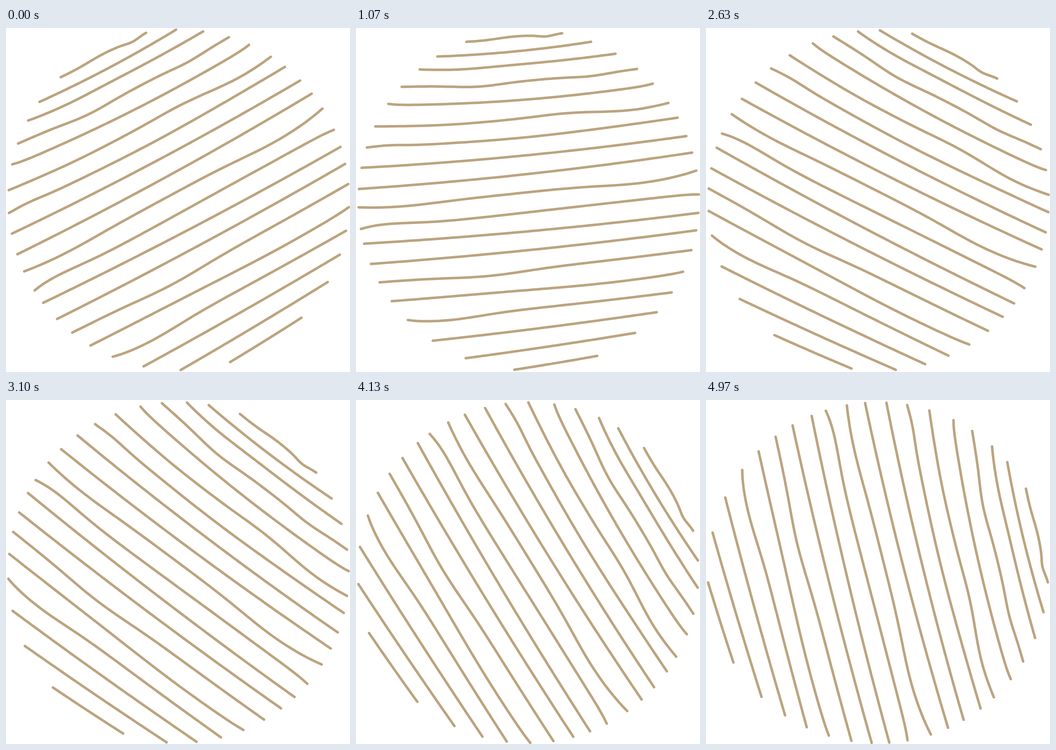
Recreate the animation shown at these times as an HTML page. Size 748x748 px, loop 5010 ms.

```html
<!DOCTYPE html>
<html lang="en">
<head>
<meta charset="utf-8">
<title>Turning lines</title>
<style>
  html, body { margin: 0; height: 100%; overflow: hidden; background: #fff; }
  svg { display: block; width: 100%; height: 100%; }
  path { fill: none; stroke: #bba47f; stroke-width: 5.5; stroke-linecap: round; stroke-linejoin: round; }
</style>
</head>
<body>
<svg viewBox="0 0 748 748"><path id="lines"/></svg>
<script>
const LOOP = 5010, FRAMES = 150, STEP = 0.7, START = -22.4;
const CX = 375.5, CY = 374.3, R = 370, SAMPLES = 60;

// Each line: height of its left and right end on the circle,
// then its waves as [place along the line, height, width].
const lines = [
  [30, 11.5, [0.5, -5.6, 0.28], [0.83, 3.2, 0.1]],
  [62, 30],
  [90, 56, [0.2, 3, 0.2]],
  [128, 89, [0.32, 6, 0.14], [0.8, 3.5, 0.1]],
  [165, 121, [0.5, 6, 0.6]],
  [214, 163, [0.25, 3, 0.2], [0.64, -3, 0.12], [0.88, 5.5, 0.13]],
  [260, 195, [0.06, -3, 0.08], [0.5, 3, 0.3]],
  [304, 235],
  [350, 271],
  [390, 310, [0.13, 5, 0.15], [0.85, 10, 0.17]],
  [437, 362, [0.06, -6, 0.13], [0.65, -6.5, 0.45]],
  [469, 402],
  [513, 440],
  [553, 483, [0.35, 6.5, 0.16]],
  [594, 530, [0.75, 4.5, 0.3]],
  [635, 575, [0.15, 8, 0.18]],
  [680, 618],
  [718, 663],
  [743, 713]
];

const halfChord = y => Math.sqrt(R * R - (y - CY) ** 2);

function trace([left, right, ...waves], i) {
  const x0 = CX - halfChord(left), x1 = CX + halfChord(right);
  const sag = (x1 - x0) * (0.016 - 0.0007 * i);   // upper lines hang more
  const points = [];
  for (let k = 0; k <= SAMPLES; k++) {
    const u = k / SAMPLES;
    const pin = 1 - (2 * u - 1) ** 16;            // keeps the ends in place
    let y = left + (right - left) * u + sag * 4 * u * (1 - u);
    for (const [at, size, width] of waves) {
      y += pin * size * Math.exp(-(((u - at) / width) ** 2));
    }
    points.push(`${x0 + (x1 - x0) * u},${y}`);
  }
  return "M" + points.join("L");
}

const path = document.getElementById("lines");
path.setAttribute("d", lines.map(trace).join(""));

// Thirty steps per second, with step times rounded to 10 ms.
function draw() {
  const t = Math.floor(performance.now() % LOOP / 10) * 10;
  const n = Math.min(FRAMES - 1, Math.floor((t + 5) * 30 / 1000));
  path.setAttribute("transform", `rotate(${START + n * STEP} 374 374)`);
  requestAnimationFrame(draw);
}
draw();
</script>
</body>
</html>
```
